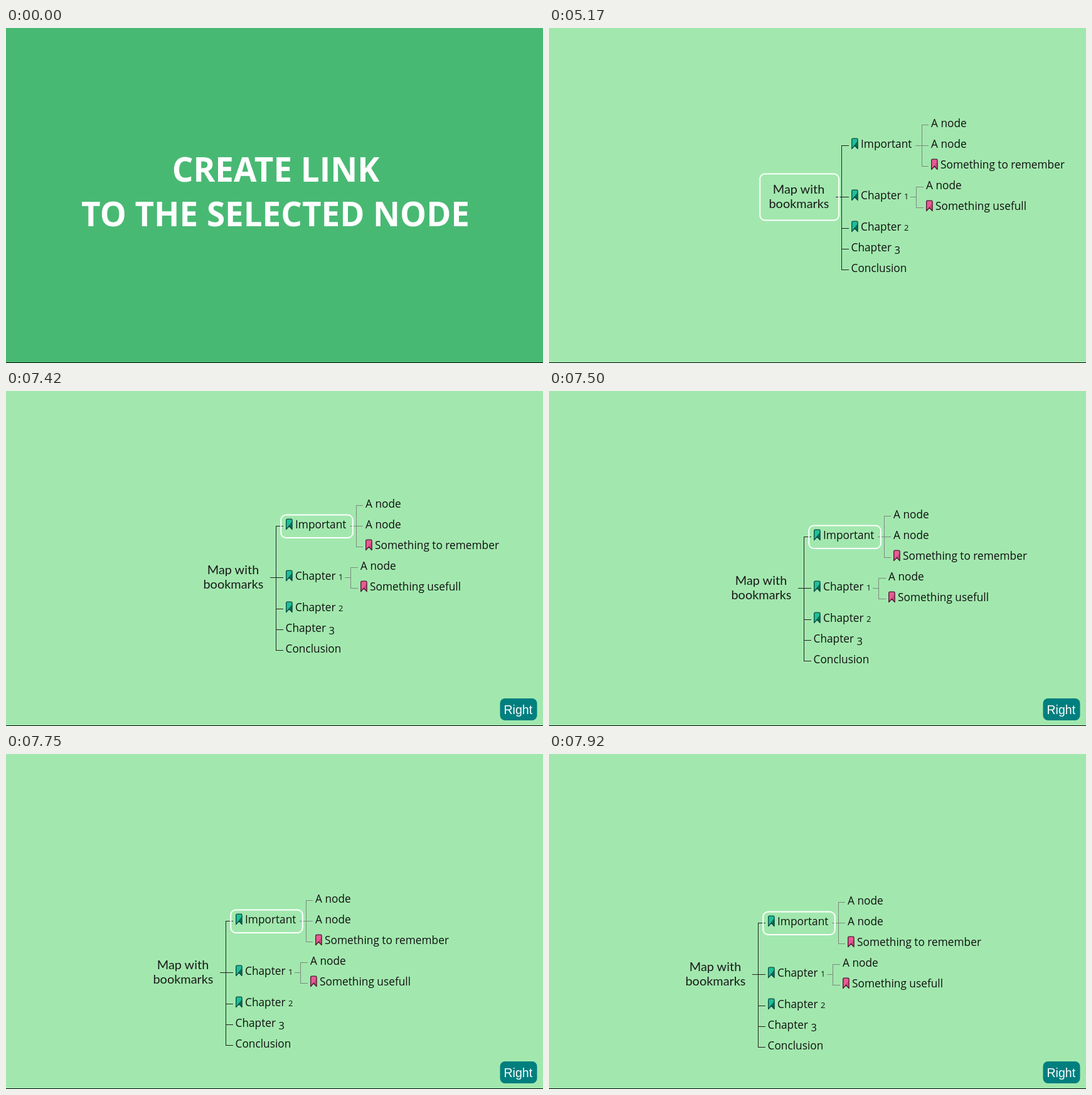
Write an HTML page that moves like this. It is 856 px wide and 534 px high and loops after 8000 ms.

```html
<!DOCTYPE html>
<html lang="en">
<head>
<meta charset="utf-8">
<title>Bookmark links</title>
<style>
  html, body { margin: 0; width: 100%; height: 100%; overflow: hidden; }
  svg { display: block; width: 100vw; height: 100vh; }
  text { font-family: "Open Sans", sans-serif; white-space: pre; }
  .title { font-weight: 700; fill: #fff; text-anchor: middle; }
  .node { font-size: 17.3px; fill: #111; }
  .root { font: 19.9px Lato, sans-serif; fill: #1a1a1a; text-anchor: middle; }
  .key { font: 19.5px "Liberation Sans", Arial, sans-serif; fill: #fff; text-anchor: middle; }
  .line { fill: none; stroke: #222; shape-rendering: crispEdges; }
  .sub { stroke: #7c8a7e; }
  .selection { fill: none; stroke: #fff; stroke-width: 2; }
</style>
</head>
<body>
<svg viewBox="0 0 856 534">
  <defs>
    <path id="ribbon" d="M.7 2.4Q.7.7 2.4.7H8.4Q10.1.7 10.1 2.4V17L5.4 12 .7 17Z"/>
  </defs>
  <rect id="background" width="856" height="534"/>
  <g id="intro" class="title" font-size="52.9">
    <text x="430" y="245">CREATE LINK</text>
    <text x="429.5" y="316">TO THE SELECTED NODE</text>
  </g>
  <g id="command" class="title" font-size="50.8">
    <text x="430" y="241">Command</text>
    <text x="430.5" y="312">Create link in bookmarked node</text>
  </g>
  <g id="map">
    <path class="line" d="M466.5 187V386M466 187.5H478M457 269.5H478M466 319.5H478M466 352.5H478M466 385.5H478"/>
    <path class="line sub" d="M594.5 154V221M594 154.5H605M584 187.5H605M594 220.5H605M585.5 253V287M585 253.5H597M576 269.5H585M585 286.5H597"/>
    <text class="root" x="398" y="264">Map with</text>
    <text class="root" x="398.5" y="287">bookmarks</text>
    <g id="nodes"></g>
    <rect id="rootBox" class="selection" x="336.2" y="232.5" width="126" height="74" rx="8"/>
    <rect id="childBox" class="selection" x="474.3" y="169.5" width="114.5" height="36.5" rx="8"/>
  </g>
  <g id="key">
    <rect x="787.5" y="490" width="59" height="35" rx="8" fill="#007f7f"/>
    <text class="key" x="816.3" y="515">Right</text>
  </g>
  <rect y="533" width="856" height="1" fill="#000"/>
</svg>
<script>
const $ = id => document.getElementById(id);
const TEAL = { fill: '#1fbf98', shade: '#0b6b58', edge: '#0d4a40' };
const PINK = { fill: '#ea5a94', shade: '#d24580', edge: '#4b1830' };

// Old-style figures: 1 and 2 stand at x-height, 3 descends.
const figures = label => label.replace(/\d/, digit =>
  `<tspan ${digit === '3' ? 'font-size="16.5" dy="4"' : 'font-size="13"'}>${digit}</tspan>`);

const ribbon = (x, y, { fill, shade, edge }) => `
  <g transform="translate(${x} ${y})">
    <use href="#ribbon" fill="${fill}"/>
    <path d="M10 4.5L2.5 14 5.4 12 10 17Z" fill="${shade}"/>
    <use href="#ribbon" fill="none" stroke="${edge}" stroke-width="1.3" stroke-linejoin="round"/>
  </g>`;

const node = (x, y, label, color) =>
  (color ? ribbon(x, y - 15.5, color) : '') +
  `<text class="node" x="${x + (color ? 15 : 0)}" y="${y}">${figures(label)}</text>`;

$('nodes').innerHTML = [
  [482, 191, 'Important', TEAL],
  [482, 273, 'Chapter 1', TEAL],
  [482, 323, 'Chapter 2', TEAL],
  [481.5, 356, 'Chapter 3'],
  [481.5, 389, 'Conclusion'],
  [609, 158, 'A node'],
  [609, 191, 'A node'],
  [609, 224, 'Something to remember', PINK],
  [601, 257, 'A node'],
  [601, 290, 'Something usefull', PINK]
].map(args => node(...args)).join('');

// Stepped scroll of the map: [start in ms, x, y]
const scroll = [
  [0, 0, 0], [7340, -11, 9], [7420, -36, 28], [7500, -60, 45], [7590, -81, 59],
  [7670, -100, 71], [7750, -116, 79], [7840, -127, 82], [7920, -133, 82]
];

const show = (id, visible) => $(id).setAttribute('display', visible ? 'inline' : 'none');

function draw(now) {
  const t = now % 8000;
  const mapVisible = t >= 5170;
  const [, x, y] = scroll.findLast(([start]) => t >= start);
  $('background').setAttribute('fill', mapVisible ? '#a2e8ae' : '#48b973');
  show('intro', t < 500);
  show('command', t >= 500 && !mapVisible);
  show('map', mapVisible);
  show('rootBox', t < 7420);
  show('childBox', t >= 7420);
  show('key', t >= 7340);
  $('map').setAttribute('transform', `translate(${x} ${y})`);
}

function tick() {
  draw(performance.now());
  requestAnimationFrame(tick);
}
tick();
</script>
</body>
</html>
```
